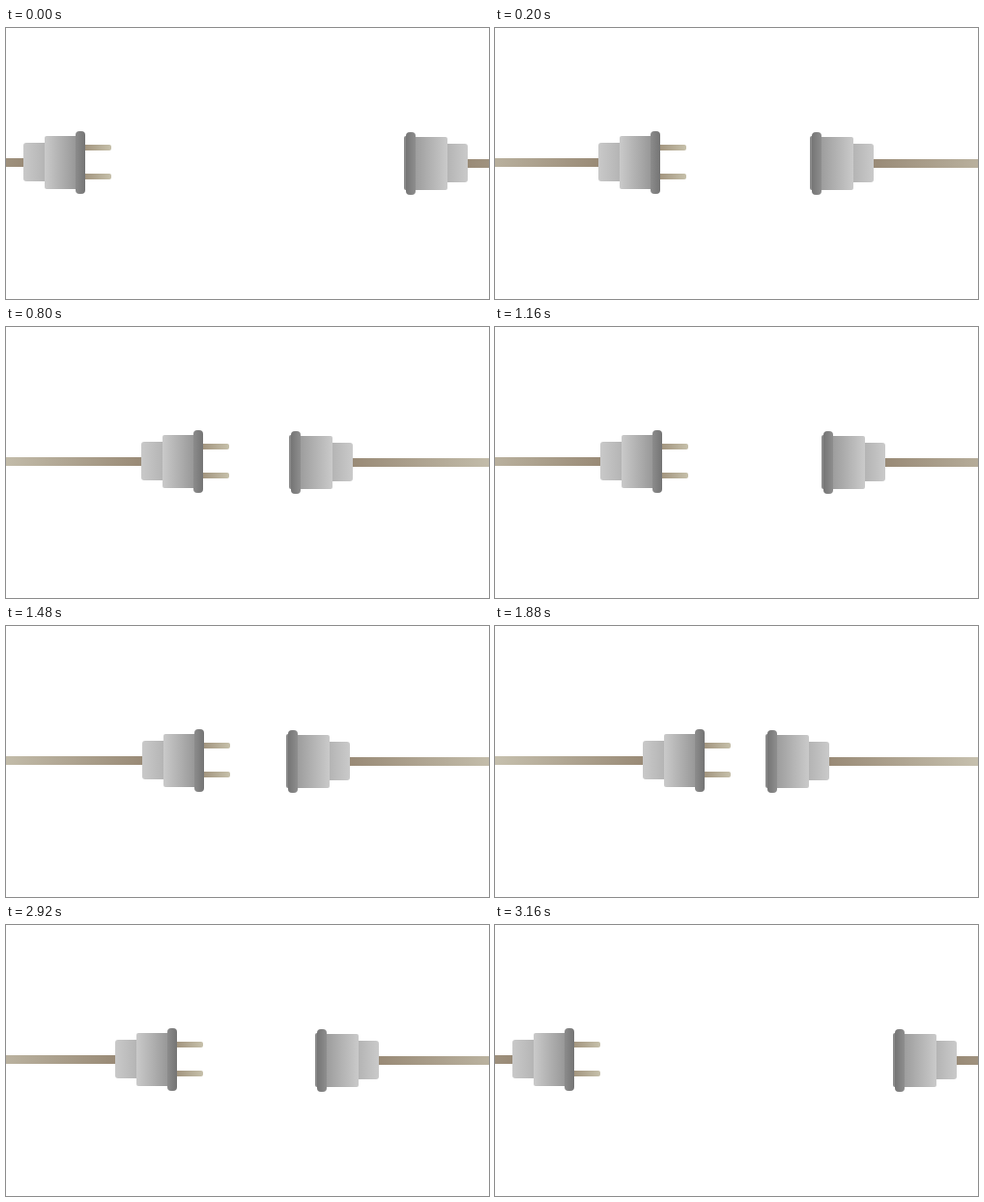
These frames come from a looping animation (500x281 px, 3.2 s). An HTML page:

```html
<!DOCTYPE html>
<html lang="en">
<head>
<meta charset="utf-8">
<title>Plug and socket</title>
<style>
html, body { margin: 0; width: 100%; height: 100%; overflow: hidden; background: #fff; }
svg { display: block; width: 500px; height: 281px; }
</style>
</head>
<body>
<svg viewBox="0 0 500 281">
  <defs>
    <linearGradient id="cord"><stop stop-color="#cbc6b4"/><stop offset="1" stop-color="#998a76"/></linearGradient>
    <linearGradient id="cordBack"><stop stop-color="#998a76"/><stop offset="1" stop-color="#cbc6b4"/></linearGradient>
    <linearGradient id="prong"><stop stop-color="#a0927c"/><stop offset="1" stop-color="#c6c0aa"/></linearGradient>
    <linearGradient id="neck"><stop stop-color="#c9c9c9"/><stop offset="1" stop-color="#b2b2b2"/></linearGradient>
    <linearGradient id="neckBack"><stop stop-color="#b0b0b0"/><stop offset="1" stop-color="#cacaca"/></linearGradient>
    <linearGradient id="body"><stop stop-color="#cacaca"/><stop offset="1" stop-color="#929292"/></linearGradient>
    <linearGradient id="bodyBack"><stop stop-color="#999"/><stop offset="1" stop-color="#cacaca"/></linearGradient>
    <linearGradient id="rim"><stop stop-color="#8c8c8c"/><stop offset="1" stop-color="#747474"/></linearGradient>
    <linearGradient id="rimBack"><stop stop-color="#757575"/><stop offset="1" stop-color="#8e8e8e"/></linearGradient>
  </defs>
  <!-- x = 0 is where each cord meets its neck -->
  <g id="plug">
    <rect x="-170" y="135" width="171" height="9" fill="url(#cord)"/>
    <rect x="62" y="121" width="29" height="6" rx="2" fill="url(#prong)"/>
    <rect x="62" y="151" width="29" height="6" rx="2" fill="url(#prong)"/>
    <rect y="119" width="25" height="40" rx="3" fill="url(#neck)"/>
    <rect x="22" y="112" width="36" height="55" rx="2" fill="url(#body)"/>
    <rect x="54" y="107" width="10" height="65" rx="4" fill="url(#rim)"/>
  </g>
  <g id="socket">
    <rect x="-1" y="136" width="171" height="9" fill="url(#cordBack)"/>
    <rect x="-25" y="120" width="25" height="40" rx="3" fill="url(#neckBack)"/>
    <rect x="-66" y="112" width="6" height="56" rx="2" fill="#8a8a8a"/>
    <rect x="-57" y="113" width="36" height="55" rx="2" fill="url(#bodyBack)"/>
    <rect x="-64" y="108" width="10" height="65" rx="4" fill="url(#rimBack)"/>
  </g>
</svg>
<script>
const LOOP = 3200, STEP = 40;
const hits = [-265, 265, 833, 1380, 1915, 2520];   // moments of closest approach
const plug = { el: document.getElementById('plug'), from: 18, to: 160, depth: [1, .79, .376, .24, .07] };
const socket = { el: document.getElementById('socket'), from: 478, to: 340, depth: [1, .74, .487, .21, .08] };

// Distance still to go, 1 = fully apart, 0 = closest
function gap(t, depth) {
  if (t >= 2520) return Math.max(0, (t - 2800) / 360);
  const i = hits.findIndex(h => t < h) - 1;
  return depth[i] * Math.sin(Math.PI * (t - hits[i]) / (hits[i + 1] - hits[i]));
}

function place({ el, from, to, depth }, t) {
  const x = Math.round(to + (from - to) * gap(t, depth));
  el.setAttribute('transform', `translate(${x} 0)`);
}

function draw() {
  const t = Math.floor(performance.now() % LOOP / STEP) * STEP;
  place(plug, t);
  place(socket, t);
  requestAnimationFrame(draw);
}
draw();
</script>
</body>
</html>
```
